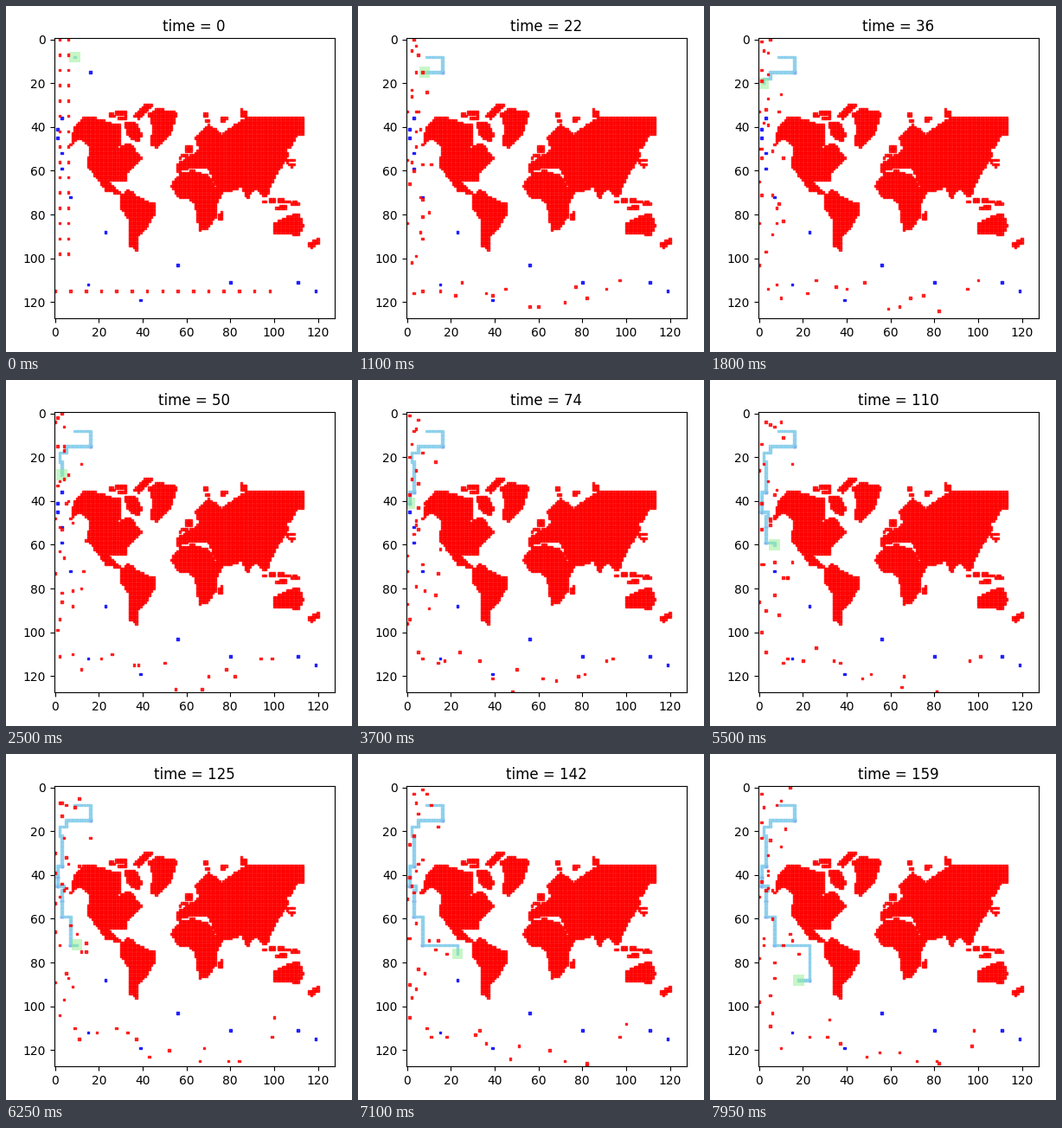
Animation of 400x400 px, one loop 8000 ms. Source, as a matplotlib script:

```python
import random

import matplotlib.pyplot as plt
import numpy as np
from matplotlib.animation import FuncAnimation
from matplotlib.collections import PolyCollection
from matplotlib.patches import Rectangle
from matplotlib.path import Path

GRID = 128
FRAMES = 160
ALPHA = 0.8

rng = random.Random(12)
land = np.zeros((GRID, GRID), bool)
cells = np.array([(x, y) for y in range(GRID) for x in range(GRID)])


def region(*corners):
    inside = Path(corners).contains_points(cells).reshape(GRID, GRID)
    land[inside] = True


def islands(left, top, right, bottom, count):
    for _ in range(count):
        x, y = rng.randint(left, right), rng.randint(top, bottom)
        land[y:y + rng.randint(1, 2), x:x + rng.randint(1, 3)] = True


def north_america():
    region((7, 48), (8.5, 40), (13, 35.2), (17, 35.5), (29, 39), (29, 49), (34, 47),
           (39.5, 54.5), (32, 61), (32.5, 64.5), (24, 64.5), (31, 71), (23, 69),
           (14.6, 57.5), (15.5, 49), (11, 45))
    region((31, 37), (36, 37), (39.6, 44), (37.6, 47), (33, 43.5))
    region((35.5, 35), (41, 29.4), (44.6, 29.6), (38, 36))
    islands(25, 33, 33, 36, 6)


def greenland():
    region((42.4, 34), (47, 31.4), (55.6, 33.2), (52.6, 42.6), (46, 49), (43.5, 48),
           (44.5, 40))


def south_america():
    region((30, 71), (33, 68.7), (41, 73.5), (45.6, 75), (45.6, 79.5), (42, 85),
           (38, 89.5), (37.6, 97.2), (34, 94), (33.6, 82.5), (29.4, 76.5))


def africa():
    region((57, 60.6), (63, 59.8), (70.5, 62.4), (74, 69.4), (76.6, 69.8), (73, 76),
           (73, 81), (69.6, 86.6), (65.6, 87.2), (63.6, 75.5), (61.6, 72.6),
           (57, 72.6), (52.6, 67))
    region((74.4, 80), (76.5, 78), (76, 82), (74.4, 83.4))


def eurasia():
    region((56, 60.4), (55.7, 56.6), (65.5, 50.5), (64, 45), (70, 38.6), (76, 43),
           (82, 39), (87, 35.5), (113.6, 35.4), (113.6, 43.6), (110.5, 43.8),
           (107.5, 49.6), (104.5, 49), (106.6, 53), (102, 59.5), (98, 67),
           (96.5, 72.4), (91.5, 68), (87.5, 72.6), (85, 67.5), (77.5, 70), (74, 69),
           (70, 59), (63.5, 58))
    islands(57, 48, 60, 54, 5)
    islands(67, 33, 76, 37, 4)
    islands(83, 32, 86, 34, 3)
    islands(106, 54, 108, 59, 5)


def oceania():
    islands(94, 73, 109, 77, 11)
    region((99.6, 84), (107, 80.4), (111, 79.4), (113.4, 85), (110.5, 90),
           (107, 88), (99.6, 88.5))
    region((114.5, 93.6), (120.6, 90.5), (120.6, 92.6), (117, 95.5))


for draw_part in (north_america, greenland, south_america, africa, eurasia, oceania):
    draw_part()

# The agent visits the stops in turn, moving along x first and then along y.
start = (9, 8)
detours = [(5, 18), (2, 22), (4, 47)]
stops = [(16, 15), (5, 18), (2, 22), (3, 36), (1, 41), (1, 45), (4, 47), (3, 52),
         (3, 59), (7, 72), (23, 88), (15, 112)]
goals = [s for s in stops if s not in detours]
goals += [(56, 103), (80, 111), (111, 111), (119, 115), (39, 119)]


def walk_route():
    x, y = start
    route = [start]
    for gx, gy in stops:
        while (x, y) != (gx, gy):
            if x != gx:
                x += 1 if gx > x else -1
            else:
                y += 1 if gy > y else -1
            route.append((x, y))
    return route


route = walk_route()


def progress(t):
    """Cells covered by time t; the agent is slower in the crowded strip."""
    return int(np.ceil(np.interp(t, [0, 28, 96, 159], [0, 28, 70, 133])))


def wander(points):
    """Random walk of every point, kept on the grid and off the land."""
    history = [points]
    moves = [(0, 0), (1, 0), (-1, 0), (0, 1), (0, -1)]
    for _ in range(FRAMES - 1):
        moved = []
        for x, y in history[-1]:
            dx, dy = rng.choice(moves)
            u, v = x + dx, y + dy
            free = 0 <= u < GRID and 0 <= v < GRID and not land[v, u]
            moved.append((u, v) if free else (x, y))
        history.append(moved)
    return history


line = range(0, 99, 7)
walkers = wander([(x, k) for x in (2, 6) for k in line] + [(k, 115) for k in line])


def squares(points):
    corners = np.array([(-0.5, -0.5), (0.5, -0.5), (0.5, 0.5), (-0.5, 0.5)])
    return [corners + p for p in points]


fig, ax = plt.subplots(figsize=(4, 4), dpi=100)
ax.set_aspect("equal")
ax.set_xlim(-0.5, GRID - 0.5)
ax.set_ylim(GRID - 0.5, -0.5)
title = ax.set_title("time = 0")
fig.tight_layout()


def layer(color, z, points=()):
    coll = PolyCollection(squares(points), facecolor=color, edgecolor=color,
                          linewidth=1, alpha=ALPHA, zorder=z)
    ax.add_collection(coll, autolim=False)
    return coll


layer("red", 1, [(x, y) for y, x in np.argwhere(land)])
layer("blue", 1.2, goals)
trail = layer("skyblue", 1.4)
halo = ax.add_patch(Rectangle((0, 0), 5, 5, color="lightgreen", alpha=0.5,
                              linewidth=0, zorder=1.6))
walker_dots = layer("red", 1.8)


def draw(t):
    done = route[:progress(t) + 1]
    trail.set_verts(squares(dict.fromkeys(done)))
    walker_dots.set_verts(squares(walkers[t]))
    x, y = done[-1]
    halo.set_xy((x - 2.5, y - 2.5))
    title.set_text(f"time = {t}")
    return trail, halo, walker_dots, title


anim = FuncAnimation(fig, draw, frames=FRAMES, init_func=lambda: draw(0),
                     interval=50, repeat=True, repeat_delay=0)
plt.show()
```
